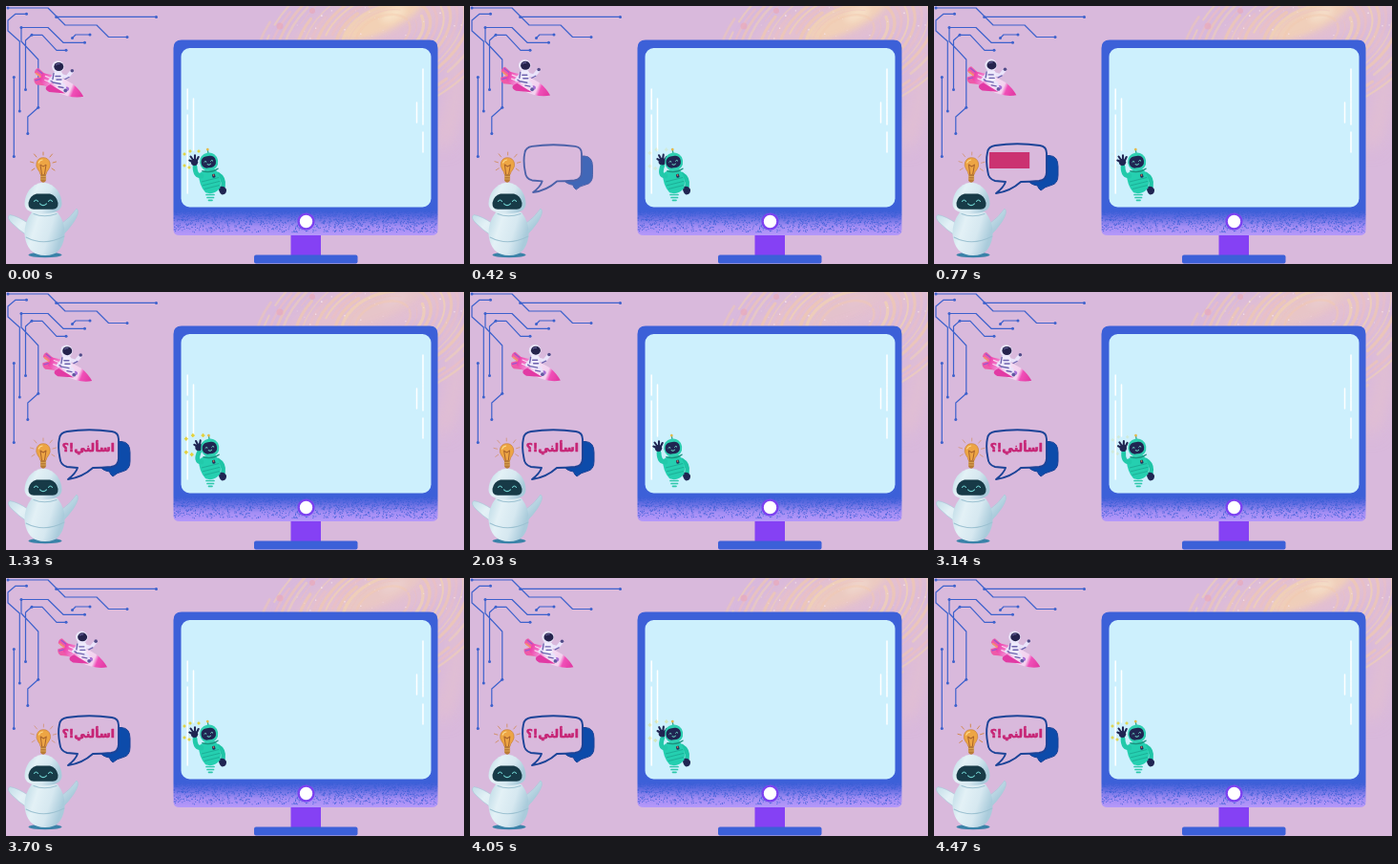
An HTML page that plays this animation: 480 px wide and 270 px high, repeating every 4.54 s.

```html
<!DOCTYPE html>
<html lang="ar">
<head>
<meta charset="utf-8">
<style>
html, body { margin: 0; width: 100%; height: 100%; overflow: hidden; background: #d9b9dc; }
svg { display: block; width: 100vw; height: 100vh; }
text { font: bold 12.2px "DejaVu Sans", sans-serif; direction: rtl; }
</style>
</head>
<body>
<svg viewBox="0 0 480 270" stroke-linecap="round" stroke-linejoin="round">
  <defs>
    <filter id="soft" x="-30%" y="-30%" width="160%" height="160%"><feGaussianBlur stdDeviation="3"/></filter>
    <filter id="haze" x="-40%" y="-40%" width="180%" height="180%"><feGaussianBlur stdDeviation="9"/></filter>
    <linearGradient id="frame" gradientUnits="userSpaceOnUse" x1="0" y1="214" x2="0" y2="240">
      <stop offset="0" stop-color="#3c60d8"/><stop offset=".25" stop-color="#5e6be0"/>
      <stop offset=".65" stop-color="#a48ef4"/><stop offset="1" stop-color="#b598fa"/>
    </linearGradient>
    <linearGradient id="shell" x1="0" x2="1" y2=".35">
      <stop offset="0" stop-color="#b9d8e4"/><stop offset=".35" stop-color="#e3f1f6"/>
      <stop offset=".7" stop-color="#d6e8f0"/><stop offset="1" stop-color="#a9cbdb"/>
    </linearGradient>
    <linearGradient id="hull" x1="0" x2="1">
      <stop offset="0" stop-color="#ee3ea9"/><stop offset=".22" stop-color="#f08bd2"/>
      <stop offset=".4" stop-color="#f5dff4"/><stop offset=".68" stop-color="#f3d0ee"/>
      <stop offset=".76" stop-color="#f04fb8"/><stop offset="1" stop-color="#e0369f"/>
    </linearGradient>
    <clipPath id="textBox"><rect id="reveal" y="148" height="30"/></clipPath>
    <clipPath id="case"><path d="M175.5 214H452.5V234Q452.5 240 446 240H182Q175.5 240 175.5 234Z"/></clipPath>
  </defs>
  <rect width="480" height="270" fill="#d9b9dc"/>

  <g id="galaxy" fill="none">
    <g filter="url(#haze)">
      <ellipse cx="395" cy="14" rx="105" ry="28" transform="rotate(-18 395 14)" fill="#e3c0d0"/>
      <path d="M468 30Q482 85 458 140" stroke="#e3c0d0" stroke-width="16"/>
    </g>
    <g id="core" filter="url(#soft)">
      <ellipse cx="395" cy="14" rx="46" ry="13" transform="rotate(-25 395 14)" fill="#f3d2b4"/>
      <ellipse cx="406" cy="9" rx="14" ry="6" transform="rotate(-25 406 9)" fill="#f9e4c6"/>
    </g>
    <g id="spiral"></g>
    <g fill="#e8a9bb" opacity=".7">
      <circle cx="287" cy="21" r="3.5"/><circle cx="321" cy="5" r="3"/>
    </g>
    <g id="stars" fill="#f6e2ea"></g>
  </g>

  <g id="circuit" fill="none" stroke="#3c61cc" stroke-width="1.2">
    <path d="M52.7 11.4H157.5M2 2H44L62 20H95L107.5 32.5H127M16 22.5H44L60 38.3H82.5M69.5 33.5L73 30H88M27 30.3H38L53 46.3H63"/>
    <path d="M21.5 8.3H10L2 15V26L14.3 37V110M8.3 74.5V157.5M27 30.3L20.5 36V87.5M16 22.5V37L33.8 56V106.3L22.8 116V133.5"/>
  </g>

  <g id="rocket">
    <g transform="translate(56 81) rotate(22)">
      <path d="M-16 -4L-27 -8Q-30 -6 -29 -2L-22 0L-27 4Q-26 8 -22 9L-12 6Z" fill="#ef5aa8"/>
      <path d="M-17 -3L-27 -6M-21 2L-25 5" stroke="#9a55cf" stroke-width="1.3"/>
      <path d="M-20 0L-27 -2" stroke="#f3916f" stroke-width="1.8"/>
      <path d="M-21 -5Q-2 -9 13 -6Q22 -3 28 2Q18 9 0 8Q-14 8 -21 4Z" fill="url(#hull)"/>
      <path d="M-9 3Q-16 10 -7 11L9 6Z" fill="#e23aa4"/>
      <circle cx="9" cy="1" r="2.2" fill="#a66ed6"/>
      <path d="M-17 -3H-11M-16 1H-10" stroke="#f9d3ef" stroke-width="1.2"/>
    </g>
    <g stroke="#e9e3fa" stroke-width="3.8" fill="none">
      <path d="M57 71L64 73L69 67M51 71L46 77M52 79L60 81L62 87"/>
    </g>
    <path d="M47 77L49 78M55 83L60 84M62 75L66 73" stroke="#6d62ae" stroke-width="1.3"/>
    <rect x="49" y="67" width="10.5" height="14" rx="4" fill="#eeeafb"/>
    <path d="M52 72H57M53 75.5H58M49 78.5L57 80M50 69L49 75" stroke="#6d62ae" stroke-width="1.4"/>
    <circle cx="54.5" cy="62" r="6.3" fill="#eae6fa"/>
    <ellipse cx="55.3" cy="62" rx="5" ry="4.5" fill="#25234c"/>
    <path d="M52.5 60Q54 58.6 56 59" stroke="#867fc0" stroke-width=".8" fill="none"/>
    <circle cx="69.3" cy="66.3" r="1.8" fill="#514b88"/>
    <circle cx="62.3" cy="87" r="1.9" fill="#6259a1"/>
  </g>

  <g id="helper">
    <ellipse cx="41" cy="260.5" rx="17.5" ry="2.8" fill="#3a82a8"/>
    <path d="M24 228Q13 220 4 218.5Q0 221 6 227Q14 235 22 240ZM58 228Q68 221 74 212Q78 215 71 226Q65 235 59 240Z" fill="url(#shell)" stroke="#a9cbda" stroke-width=".7"/>
    <path d="M27 216Q41 212 54 216Q62 226 61.5 239Q60 255 50 259.5Q41 262.5 32 259.5Q21 255 19.5 239Q19 226 27 216Z" fill="url(#shell)"/>
    <path d="M21 242Q40 252 61 241M29 217.5Q40 222 53 217.5" fill="none" stroke="#9dc2d2" stroke-width="1.1"/>
    <path d="M39 184.5C52 186 58.5 197 58.5 207Q58.5 217 39 217.3Q19.5 217 19.5 207C19.5 197 26 186 39 184.5Z" fill="url(#shell)"/>
    <path d="M32 196.5H46Q53 198 54.5 206Q55 212.5 49 212.7H29Q23 212.5 23.5 206Q25 198 32 196.5Z" fill="#173a47"/>
    <path d="M29.5 204.5Q31.5 201.5 33.5 204.5M44.5 204.5Q46.5 201.5 48.5 204.5M35.5 206.8Q39 210.3 42.5 206.8" fill="none" stroke="#6fcfce" stroke-width="1.1"/>
  </g>
  <g id="bulb">
    <path id="rays" d="M39 156V153M32 158L29.5 155M46 158L48.5 155M29 164L25.5 163M49 164L52.5 163M30 170L27 172M48 170L51 172" stroke="#cf8442" stroke-width=".9"/>
    <path d="M36 176Q35.6 173.5 33.4 171Q31 167.5 32 164Q33.6 158.7 39 158.7Q44.4 158.7 46 164Q47 167.5 44.6 171Q42.4 173.5 42 176Z" fill="#eda544" stroke="#c98135" stroke-width=".7"/>
    <path d="M37.5 176L36 166L39 168L42 166L40.5 176" fill="none" stroke="#a8622c" stroke-width="1"/>
    <path d="M34.3 164Q35.3 161.3 38 161" fill="none" stroke="#fbdc8e" stroke-width="1.2"/>
    <path d="M36.2 176H41.8V183Q39 186.5 36.2 183Z" fill="#b97b35"/>
    <path d="M36.2 178.5H41.8M36.2 181H41.8" stroke="#e0ad58" stroke-width=".8"/>
  </g>

  <g id="bubble">
    <path d="M111 156.5H121Q130 157 130 168V177Q130 186 123 187.5Q116 189 112 193Q109 191 108.5 188Q101 187 98 182Z" fill="#0d4baa" stroke="#1b4397" stroke-width="1"/>
    <path d="M64 146Q87 142.5 111 146Q118 147 118 154V174Q118 182 110 183Q100 184 91 184Q80 194 65 196Q73 190 75 184L64 183Q57 181 56.5 174Q54 162 56 153Q57 147 64 146Z" fill="#d9b9dc" stroke="#1b4397" stroke-width="1.9"/>
  </g>
  <g clip-path="url(#textBox)">
    <text x="86.3" y="167" text-anchor="middle" fill="#c62475" stroke="#c62475" stroke-width=".6">اسألني!؟</text>
  </g>
  <rect id="block" y="153" height="17" fill="#cb3271"/>

  <g id="monitor">
    <path d="M298.5 238H330V262H298.5Z" fill="#8541f4"/>
    <rect x="260" y="260.5" width="108.5" height="9" rx="2" fill="#3c60d8"/>
    <path d="M184 35.5H444Q452.5 35.5 452.5 44V234Q452.5 240 446 240H182Q175.5 240 175.5 234V44Q175.5 35.5 184 35.5Z" fill="url(#frame)"/>
    <path id="grain" clip-path="url(#case)" stroke="#3d5fd6" stroke-width=".85" fill="none"/>
    <rect x="183.5" y="44" width="262" height="166.5" rx="9" fill="#cdf0fd"/>
    <path d="M190.2 87V108M190.2 114V196M196.5 97V151M437 66V124M437 132V153M430.5 101V122" stroke="#fff" stroke-width="1.5"/>
    <circle cx="314.5" cy="225.5" r="7.9" fill="#fff" stroke="#7c42f0" stroke-width="2.4"/>
  </g>

  <g id="waver">
    <g id="sparks" fill="none" stroke="#e3d23c" stroke-width="1.5"></g>
    <path d="M210 197.5H218M211 200.5H217.5M212.5 203.3H216" stroke="#2ec8ab" stroke-width="1.7"/>
    <path d="M222 176Q229 180 227.5 189" fill="none" stroke="#1fc4a6" stroke-width="4.6"/>
    <path d="M223 189Q229 187.5 231 192Q231.5 197 226.5 197.5Q222.5 195.5 223 189Z" fill="#202552"/>
    <g transform="rotate(-14 213 182)">
      <path d="M204 173Q213 169 222 173Q227 184 222 193Q214 199 206 194Q201 184 204 173Z" fill="#25cfb0"/>
      <path d="M205 182H223M205 186H223M206 190H222" stroke="#1bab93" stroke-width=".8"/>
      <rect x="217" y="177" width="3.2" height="4" rx="1" fill="#26355f"/>
      <circle cx="218.6" cy="178.2" r=".8" fill="#e2874e"/>
    </g>
    <path id="arm" fill="none" stroke="#22c9aa" stroke-width="4.8"/>
    <g id="hand" fill="none" stroke="#202552">
      <circle cx="197.5" cy="163.5" r="3.2" fill="#202552"/>
      <path d="M195.5 163L192.3 161.5M196 161L193.5 157.5M198 160V156.2M200 161.5L201.7 158" stroke-width="2.1"/>
    </g>
    <g id="head">
      <path d="M213.5 155V150.5" stroke="#2a9c89" stroke-width="1.2"/>
      <circle cx="213.5" cy="150" r="1.4" fill="#e3b94e"/>
      <rect x="203.3" y="153.5" width="19" height="19" rx="9" fill="#30cfb2"/>
      <rect x="204.7" y="157" width="15.4" height="12.2" rx="5.6" fill="#202552"/>
      <path d="M208 162.5Q209.1 161 210.2 162.5M214.8 162.5Q215.9 161 217 162.5M210.8 165.5Q212.6 167.3 214.4 165.5" stroke="#79ecd3" stroke-width=".9" fill="none"/>
      <path d="M204.5 171.5Q213 175.5 221 171.5" stroke="#1c8f7d" stroke-width="1.3" fill="none"/>
    </g>
  </g>
</svg>
<script>
const LOOP = 4540;
const el = id => document.getElementById(id);
const set = (id, attrs) => {
  for (const name in attrs) el(id).setAttribute(name, attrs[name]);
};
const add = (parent, tag, attrs) => {
  const node = document.createElementNS('http://www.w3.org/2000/svg', tag);
  for (const name in attrs) node.setAttribute(name, attrs[name]);
  el(parent).append(node);
};
const clamp = x => Math.max(0, Math.min(1, x));
const ease = x => x * x * (3 - 2 * x);
const progress = (t, from, to) => ease(clamp((t - from) / (to - from)));

// Piecewise eased value through [time, value] points
function track(points, t) {
  const i = points.findIndex(p => p[0] > t);
  if (i < 0) return points[points.length - 1][1];
  const [t0, a] = points[i - 1], [t1, b] = points[i];
  return a + (b - a) * progress(t, t0, t1);
}

let seed = 7;
const random = () => (seed = seed * 16807 % 2147483647) / 2147483647;

function buildScene() {
  const pads = [[52.7, 11.4], [157.5, 11.4], [127, 32.5], [16, 22.5], [82.5, 38.3], [69.5, 33.5],
    [88, 30], [27, 30.3], [63, 46.3], [21.5, 8.3], [2, 2], [14.3, 110], [8.3, 74.5], [8.3, 157.5],
    [20.5, 87.5], [33.8, 106.3], [22.8, 133.5]];
  for (const [cx, cy] of pads) add('circuit', 'circle', { cx, cy, r: 1.5, fill: '#3c61cc', stroke: 'none' });

  let grain = '';
  for (let i = 0; i < 1700; i++) {
    const x = 176 + random() * 276, y = 215 + 22 * random() ** 1.7;
    grain += `M${x.toFixed(1)} ${y.toFixed(1)}h.2`;
  }
  set('grain', { d: grain });

  // Broken concentric bands form the swirl
  for (let rx = 30, i = 0; rx < 150; rx += 7.5, i++) {
    add('spiral', 'ellipse', {
      cx: 395, cy: 30, rx, ry: rx * .62, transform: 'rotate(-25 395 30)',
      stroke: ['#f1c9ae', '#eec0bd', '#f2d3b2'][i % 3],
      'stroke-width': 1 + 2.4 * random(), opacity: .35 + .35 * random(),
      'stroke-dasharray': `${40 + 90 * random()} ${12 + 30 * random()}`
    });
  }
  for (let i = 0; i < 22; i++) {
    add('stars', 'circle', { cx: 280 + random() * 200, cy: random() * 34, r: .3 + random() * .6 });
  }
  for (const [x, y] of [[187, 155], [193, 152], [202, 152], [187, 167], [192, 169]]) {
    add('sparks', 'path', { d: `M${x - 1} ${y}h2M${x} ${y - 1}v2` });
  }
}

const handSway = [[0, 0], [350, 4], [770, 0], [1330, 4.5], [1700, 1], [2030, 0], [2300, 3],
  [2580, -1], [2900, 3], [3250, 0], [3450, 3], [3700, 0], [4100, 4], [4470, 0], [4540, 0]];
const sparkle = [[0, 1], [300, .3], [560, 0], [770, .05], [1050, .2], [1330, 1], [1700, .3], [2030, 0],
  [2350, .3], [2580, .7], [2900, .1], [3250, .2], [3700, 1], [4100, .3], [4470, .9], [4540, 1]];
const coreGlow = [[0, .95], [770, .8], [1330, .25], [2030, .1], [2580, .2], [3700, .4], [4540, .8]];

function draw(t) {
  const lift = 2 * (1 - progress(t, 0, 600)) - .5 + .4 * Math.sin(t / 500);
  set('rocket', { transform: `translate(${30 * t / 4470} ${lift})` });

  const turn = 3 * Math.sin(t / LOOP * 2 * Math.PI);
  set('spiral', { transform: `rotate(${turn} 395 30)` });
  set('core', { opacity: track(coreGlow, t) });

  const glow = .5 + .5 * Math.cos(t / 560 * 2 * Math.PI);
  set('rays', { opacity: .55 + .45 * glow });
  set('bulb', { transform: `rotate(${1.5 * Math.sin(t / 420)} 39 183)` });

  const pop = progress(t, 140, 560);
  set('bubble', { opacity: pop, transform: `translate(92 170) scale(${.85 + .15 * pop}) translate(-92 -170)` });

  const left = 58 + 58 * progress(t, 910, 1260);
  const right = 58 + 58 * progress(t, 560, 880);
  set('block', { x: left, width: Math.max(0, right - left) });
  set('reveal', { x: 56, width: left - 56 });

  const sway = track(handSway, t);
  const rise = -.2 * sway;
  set('hand', { transform: `translate(${sway} ${rise}) rotate(${sway * 2} 198 164)` });
  set('arm', { d: `M205 178Q198 178 ${198 + sway} ${168 + rise}` });
  set('head', { transform: `translate(${sway * .25} 0) rotate(-9 213 164)` });
  const spread = 1 + .04 * sway;
  set('sparks', {
    opacity: track(sparkle, t),
    transform: `translate(${197 + sway * .8} 163) scale(${spread}) translate(-197 -163)`
  });
}

// The motion advances in 70 ms steps, with one slightly shorter step midway
const step = t => t < 2300 ? Math.floor(t / 70) * 70 : 2300 + Math.floor((t - 2300) / 70) * 70;

buildScene();
const start = performance.now();
function tick() {
  draw(step((performance.now() - start) % LOOP));
  requestAnimationFrame(tick);
}
tick();
</script>
</body>
</html>
```
